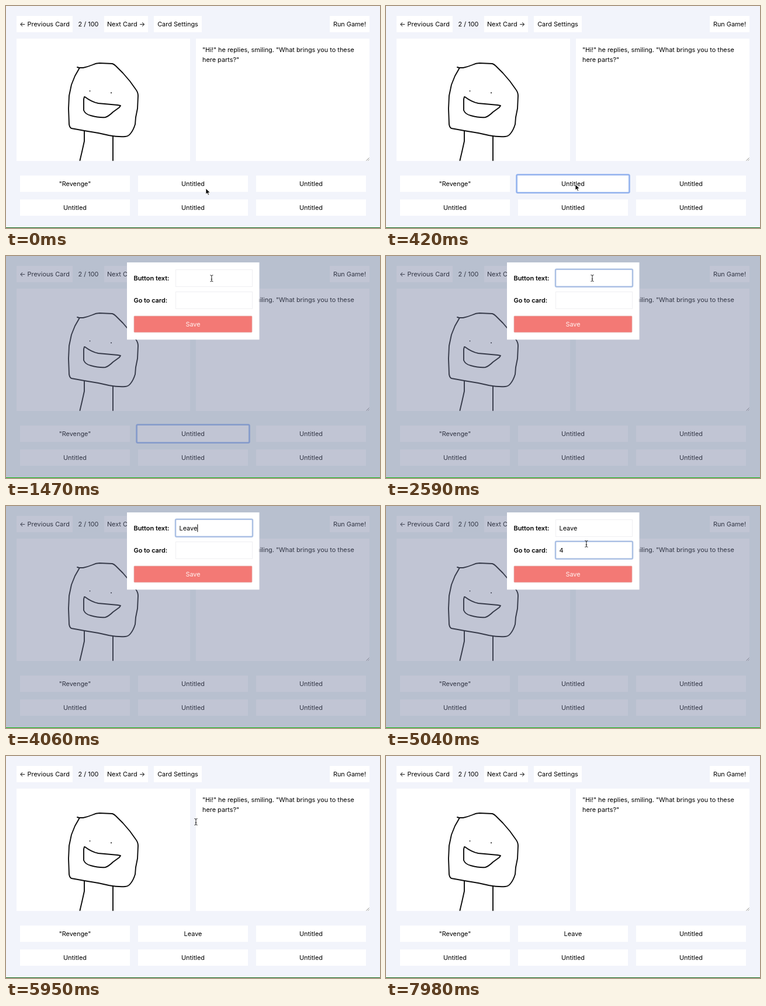
An HTML page that plays this animation: 640 by 381 pixels, repeating every 8 s.

```html
<!DOCTYPE html>
<html lang="en">
<head>
<meta charset="utf-8">
<title>Card editor</title>
<style>
html, body { margin: 0; width: 100%; height: 100%; overflow: hidden; background: #f2f4fb; }
svg { display: block; width: 640px; height: 381px; }
text { font: 10.9px Inter, "Open Sans", sans-serif; white-space: pre; }
.mid { text-anchor: middle; }
.label { font-weight: 600; }
.ink { fill: none; stroke: #0b0b0b; stroke-width: 1.9; stroke-linecap: round; stroke-linejoin: round; }
.ring { fill: none; stroke: #abc0e4; stroke-width: 2.5; }
#buttonRing { stroke: #91b1ee; }
.field { fill: #fff; stroke: #efeff2; }
</style>
</head>
<body>
<svg viewBox="0 0 640 381">
  <rect id="backdrop" width="640" height="381"/>
  <g id="page"></g>
  <g class="ink">
    <path d="M122 105 L125 106 L132 106 Q141 104 148 101 Q154 98 160 98 L182 99 Q185 100 188 103 L200 115 L212 129 L222 143 Q226 148 226 154 L225 176 L222 191 L221 203 Q218 213 213 219 Q209 224 204 224 Q193 225 176 222 L158 218 L134 214 L112 210 Q109 209 108 203 L107 176 L108 154 L112 135 L118 120 L126 106"/>
    <path d="M134 156 L133 160 L133 179 Q136 186 145 188 Q160 192 170 191 Q176 189 183 182 L194 174 L196 171 L191 170 L158 167 Q147 165 135 156"/>
    <path d="M134 215 L134 232 L130 250 L126.500 265 M183 224 V265"/>
    <path d="M143.500 145.800 h.1 M180 149 h.1" stroke-width="1.800"/>
  </g>
  <path d="M616.500 265.500 L621.500 260.500 M619.500 265.500 L621.500 263.500" stroke="#888" fill="none"/>
  <rect id="buttonRing" class="ring" x="223.500" y="289.500" width="193" height="31" rx="2"/>
  <g id="dialog">
    <rect width="640" height="381" fill="rgb(112,121,156)" fill-opacity=".43"/>
    <rect x="207" y="11" width="226.500" height="132.500" fill="#fff"/>
    <text class="label" x="218.500" y="42">Button text:</text>
    <text class="label" x="218.500" y="80">Go to card:</text>
    <rect class="field" x="290.500" y="23.500" width="131" height="29"/>
    <rect class="field" x="290.500" y="61.500" width="131" height="29"/>
    <rect x="219" y="103" width="202" height="28" rx="1" fill="#f37975" stroke="#e2b0ae" stroke-width=".8"/>
    <text class="mid" x="320" y="121" fill="#fff2ef">Save</text>
    <rect id="focusRing" class="ring" rx="2"/>
    <text id="nameText" x="296.500" y="42"></text>
    <text id="cardText" x="296.500" y="80"></text>
    <rect id="caret" width="1" height="13"/>
  </g>
  <rect id="baseLine" y="380" width="640" height="1"/>
  <g id="cursor">
    <path id="arrow" d="M0 0 V10 L2.300 7.900 L3.900 11.500 L5.500 10.800 L4 7.300 H7.200 Z" fill="#000" stroke="#fff" stroke-width=".8"/>
    <path id="beam" d="M-2.500 -5.500 Q0 -5.500 0 -4 Q0 -5.500 2.500 -5.500 M0 -4 V4 M-2.500 5.500 Q0 5.500 0 4 Q0 5.500 2.500 5.500 M-1.200 1.500 H1.200" fill="none" stroke="#222"/>
    <path id="hand" d="M-1.800 1 Q-1.800 -.3 -.8 -.3 Q.2 -.3 .2 1 V4.500 Q1.500 3.300 2.300 4.800 Q3.500 3.800 4.300 5.200 Q6 4.700 6 6.500 V8.500 Q6 10 5 12 H-.2 Q-2 9.500 -3.700 7.300 Q-4 5.600 -1.800 7 Z" fill="#fff" stroke="#222" stroke-width=".9"/>
  </g>
</svg>
<script>
const LOOP = 8000, OPEN = 460, CLOSE = 5945;
const $ = id => document.getElementById(id);
const show = (id, on) => $(id).setAttribute('display', on ? 'inline' : 'none');
const set = (id, attrs) => Object.entries(attrs).forEach(([k, v]) => $(id).setAttribute(k, v));

function add(name, attrs, text = '') {
  const el = document.createElementNS('http://www.w3.org/2000/svg', name);
  for (const k in attrs) el.setAttribute(k, attrs[k]);
  el.textContent = text;
  $('page').append(el);
  return el;
}
const box = (x, y, width, height) => add('rect', { x, y, width, height, fill: '#fff' });
const centred = (x, y, label) => add('text', { x, y, class: 'mid' }, label);
function button(x, y, w, label) {
  box(x, y, w, 28);
  return centred(x + w / 2, y + 18, label);
}

button(18, 17, 96, '← Previous Card');
centred(141, 35, '2 / 100');
button(168, 17, 75, 'Next Card →');
button(253, 17, 82, 'Card Settings');
button(554, 17, 68, 'Run Game!');
box(18, 56, 297, 210);
box(325, 56, 297, 210);
add('text', { x: 336, y: 79 }, '"Hi!" he replies, smiling. "What brings you to these');
add('text', { x: 336, y: 96 }, 'here parts?"');
const choices = [0, 1, 2, 3, 4, 5].map(i =>
  button(24 + i % 3 * 202, i < 3 ? 291 : 332, 188, i ? 'Untitled' : '"Revenge"'));

// Pointer stops: time, x, y
const stops = [
  [0, 342, 313], [280, 324, 306], [800, 324, 306], [1500, 352, 37],
  [1750, 352, 37], [2100, 361, 35], [2500, 353, 38], [4830, 353, 38],
  [5350, 325, 113], [6200, 325, 113], [6850, 332, 400]
];
function pointer(t) {
  const i = stops.findIndex(s => s[0] > t);
  if (i < 0) return stops[stops.length - 1].slice(1);
  const [t0, x0, y0] = stops[i - 1], [t1, x1, y1] = stops[i];
  const p = (t - t0) / (t1 - t0), e = p * p * (3 - 2 * p);
  return [x0 + (x1 - x0) * e, y0 + (y1 - y0) * e];
}
const inside = (x, y, l, t, r, b) => x >= l && x <= r && y >= t && y <= b;

const keys = [3150, 3330, 3500, 3710, 3880];
const CLICK = 400, FOCUS_NAME = 1600, FOCUS_CARD = 4300, KEY_CARD = 4540, PRESS = 5530;
const HIDE_POINTER = keys[0], SHOW_POINTER = 5020;
const rings = {
  name: { x: 290, y: 22.8, width: 132, height: 30 },
  card: { x: 290, y: 60.8, width: 132, height: 30 },
  save: { x: 217.3, y: 101.3, width: 205.4, height: 31.4 }
};

function draw(t) {
  const open = t >= OPEN && t < CLOSE;
  show('dialog', open);
  set('backdrop', { fill: open ? '#eef6f5' : '#f2f4fb' });
  set('baseLine', { fill: open ? '#12b812' : '#0b6112' });
  show('buttonRing', t >= CLICK && t < FOCUS_NAME);
  choices[1].textContent = t < CLOSE ? 'Untitled' : 'Leave';

  $('nameText').textContent = 'Leave'.slice(0, keys.filter(k => k <= t).length);
  $('cardText').textContent = t >= KEY_CARD ? '4' : '';

  const focus = t >= PRESS ? 'save' : t >= FOCUS_CARD ? 'card' : t >= FOCUS_NAME ? 'name' : '';
  show('focusRing', open && focus);
  if (focus) set('focusRing', rings[focus]);

  const last = [FOCUS_NAME, ...keys, FOCUS_CARD, KEY_CARD].filter(k => k <= t).pop();
  const typing = focus === 'name' || focus === 'card';
  show('caret', open && typing && (t - last) % 1000 < 500);
  if (open && typing) {
    const field = $(focus + 'Text');
    const width = field.textContent ? field.getComputedTextLength() : 0;
    set('caret', { x: 296.5 + width, y: focus === 'name' ? 31.5 : 69.5 });
  }

  const [x, y] = pointer(t);
  const hand = open && inside(x, y, 219, 103, 421, 131);
  const beam = open
    ? inside(x, y, 290, 23, 422, 53) || inside(x, y, 290, 61, 422, 91)
    : inside(x, y, 324, 56, 622, 266);
  show('cursor', t < HIDE_POINTER || t >= SHOW_POINTER);
  show('hand', hand);
  show('beam', beam);
  show('arrow', !hand && !beam);
  set('cursor', { transform: `translate(${x} ${y})` });
}

const start = performance.now();
function tick() {
  draw((performance.now() - start) % LOOP);
  requestAnimationFrame(tick);
}
tick();
</script>
</body>
</html>
```
